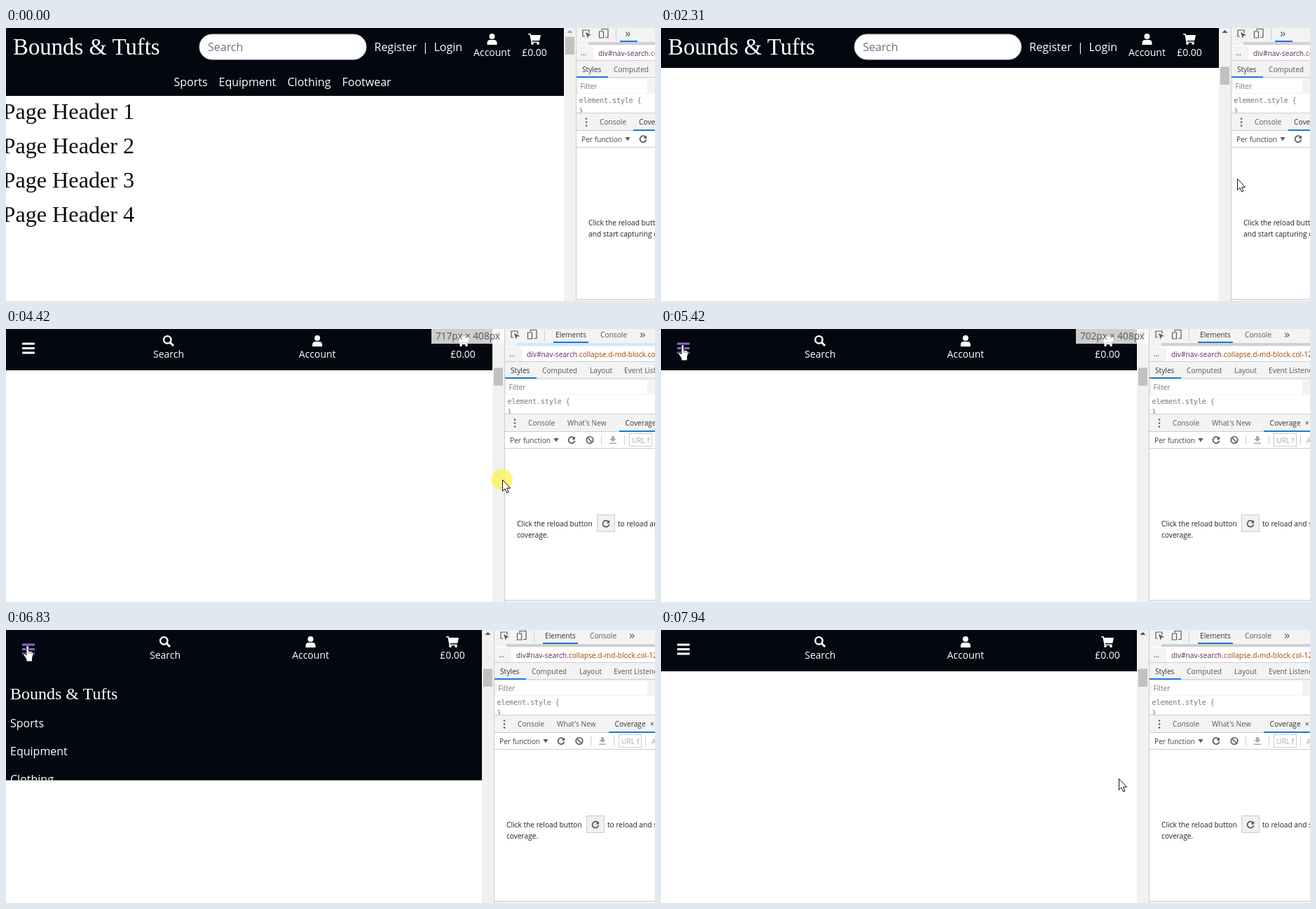
Write an HTML page that moves like this. It is 926x390 px and loops after 8000 ms.

```html
<!DOCTYPE html>
<html lang="en">
<head>
<meta charset="utf-8">
<title>Responsive navigation</title>
<style>
  html, body { margin: 0; width: 100%; height: 100%; overflow: hidden; background: #fff; }
  svg { display: block; width: 926px; height: 390px; }
  text { font-family: "Open Sans", sans-serif; white-space: pre; }
  .serif { font-family: "Liberation Serif", serif; }
  .mono { font-family: "DejaVu Sans Mono", monospace; }
</style>
</head>
<body>
<svg id="stage" viewBox="0 0 926 390"></svg>
<script>
const LOOP = 8000, SCROLLBAR = 17, MOBILE_BELOW = 762;
const DARK = '#03070f', BAR = '#f3f3f3', LINE = '#ccc', BLUE = '#1a78d8', GREY = '#5a5a5a';
const BRAND = 'Bounds &amp; Tufts';
const stage = document.getElementById('stage');

const clamp = v => Math.max(0, Math.min(1, v));
const collapse = v => 1 - (1 - clamp(v)) ** 2.2;
const smooth = v => v * v * (3 - 2 * v);

// Keys are [time, [values], smooth?]; the flag applies to the segment ending there.
function tween(t, keys) {
  if (t <= keys[0][0]) return keys[0][1];
  for (let i = 1; i < keys.length; i++) {
    const [t0, from] = keys[i - 1], [t1, to, eased] = keys[i];
    if (t < t1) {
      const p = (t - t0) / (t1 - t0), q = eased ? smooth(p) : p;
      return from.map((v, n) => v + (to[n] - v) * q);
    }
  }
  return keys[keys.length - 1][1];
}

const rect = (x, y, w, h, fill, more = '') =>
  `<rect x="${x}" y="${y}" width="${Math.max(0, w)}" height="${Math.max(0, h)}" fill="${fill}" ${more}/>`;
const text = (x, y, str, size, fill, more = '') =>
  `<text x="${x}" y="${y}" font-size="${size}" fill="${fill}" ${more}>${str}</text>`;
const path = (d, fill, more = '') => `<path d="${d}" fill="${fill}" ${more}/>`;
const line = (d, color, width) => path(d, 'none', `stroke="${color}" stroke-width="${width}"`);
const at = (x, y, content) => `<g transform="translate(${x} ${y})">${content}</g>`;

const icons = {
  user: '<circle cy="-4" r="4" fill="#fff"/>' +
    path('M-7 8V5.5Q-7 1 -2.8 1H2.8Q7 1 7 5.5V8Q7 8 6 8H-6Z', '#fff'),
  cart: path('M-9-8H-5.4L-4.9-6H9L7.3 2H-3.4L-3.1 3.5H6.6V5H-4.4L-6.7-6.4H-9Z', '#fff') +
    '<circle cx="-3" cy="6.3" r="1.8" fill="#fff"/><circle cx="5" cy="6.3" r="1.8" fill="#fff"/>',
  search: '<circle cx="-1.7" cy="-1.7" r="5.2" fill="none" stroke="#fff" stroke-width="2.4"/>' +
    line('M2 2L7 7', '#fff', 3),
  reload: line('M3.6-2.6A4.5 4.5 0 1 0 4.5 1', '#555', 1.7) + path('M5-5V-.6H.6Z', '#555'),
  arrow: path('M.5.5V16.5L4 13.2L6.6 19L9 18L6.5 12.3H11.5Z', '#fff', 'stroke="#111"'),
  resize: path('M-10 0L-5-4V-1H5V-4L10 0L5 4V1H-5V4Z', '#fff', 'stroke="#111" stroke-width=".9"'),
  hand: path('M-2 1.5Q0-1 1.6 1.5V8L5.5 8.8Q8.2 9.4 8 12.5L6.5 18V23H-2V20L-6 13.5Q-6.3 11 -4.2 11.8L-2 14Z',
    '#fff', 'stroke="#111"') + line('M2 12V9M5 12.5V10', '#111', .8)
};

const iconLink = (x, y, icon, label) =>
  at(x, y, icons[icon]) + text(x, y + 24, label, 14, '#fff', 'text-anchor="middle"');

function desktopPage(width, scroll, navHidden) {
  const k = width / 796, height = 97 - 40 * navHidden;
  const link = (x, y, label) => text(x * k, y, label, 16, '#fff');
  const headings = [1, 2, 3, 4].map(n =>
    text(-4.5, 81 + 49 * n - scroll, `Page Header ${n}`, 32.2, '#080b12', 'class="serif"')).join('');
  const links = link(239.5, 83, 'Sports') + link(303.5, 83, 'Equipment') +
    link(401.5, 83, 'Clothing') + link(479.5, 83, 'Footwear');
  return headings + rect(0, 0, width, height, DARK) +
    `<clipPath id="nav">${rect(0, 0, width, height)}</clipPath><g clip-path="url(#nav)">${links}</g>` +
    text(10, 38, BRAND, 32.8, '#fff', 'class="serif"') +
    rect(276 * k, 9, 238 * k, 36, '#fff', 'rx="18" stroke="#ced4da"') +
    text(276 * k + 12, 33, 'Search', 16, '#6c757d') +
    link(525.5, 33, 'Register') + link(594, 33, '|') + link(610.5, 33, 'Login') +
    iconLink(693.5 * k, 16, 'user', 'Account') + iconLink(754 * k, 16, 'cart', '£0.00');
}

function mobilePage(width, open, hovered) {
  const bottom = 59 + 302 * open;
  const bars = [19.5, 26, 32.5].map(y =>
    rect(23, y, 18, 3, hovered ? '#8b68c6' : '#fff', 'rx=".8"')).join('');
  const items = ['Sports', 'Equipment', 'Clothing', 'Footwear', 'Register', 'Login'].map((label, i) =>
    text(6, 139 + 40 * i, label, 16, '#fff')).join('');
  return rect(0, 0, width, bottom, DARK) + bars +
    iconLink(width * .3343, 17, 'search', 'Search') +
    iconLink(width * .64, 17, 'user', 'Account') +
    iconLink(width - 42, 17, 'cart', '£0.00') +
    `<clipPath id="menu">${rect(0, 59, width, bottom - 59)}</clipPath><g clip-path="url(#menu)">` +
    text(6, 99, BRAND, 24, '#fff', 'class="serif"') + items + '</g>';
}

const scrollbar = (x, thumb) =>
  rect(x, 0, SCROLLBAR, 390, '#f1f1f1') + rect(x + 2, 12.5 + thumb, 13, 25.5, '#c1c1c1') +
  path(`M${x + 4.5} 7L${x + 8.5} 3L${x + 12.5} 7Z`, thumb > 0 ? '#505050' : '#a3a3a3');

// Coordinates here are relative to the left edge of the tools panel.
function devtools(left, wide, resizing) {
  const label = (x, y, str, fill = GREY) => text(x, y, str, 10.2, fill);
  const rule = y => rect(0, y, 500, 1, LINE);
  const right = 915 - left;
  let out = rect(0, 0, 500, 390, '#fff') + rect(0, 0, 500, 25, BAR) +
    rect(18, 20, 500, 4, resizing ? '#cfe8fc' : '#d0d0d0') +
    line('M19 7V3H10V12H13', GREY, 1.2) + path('M14 6L22 10L18 11L17 15Z', GREY) +
    line('M37 4V1.5H46V13.5H42M33.5 5H39.5V14H33.5Z', GREY, 1.2) + rect(57, 1, 1, 17, LINE);
  out += wide
    ? label(73, 12, 'Elements', '#333') + rect(70, 18, 50, 2, BLUE) +
      label(137, 12, 'Console') + text(193, 13, '»', 17, GREY)
    : text(70, 13, '»', 17, GREY) + rect(63, 18, 25, 2, BLUE);

  out += rect(0, 26, 25, 20, BAR) + label(7, 39, '…', '#333') +
    label(32, 40, '<tspan fill="#5d2a5d">div#nav-search</tspan>' +
      '<tspan fill="#994500">.collapse.d-md-block.col-12</tspan>') +
    rule(46) + rect(0, 47, 500, 24, BAR) +
    label(9, 62.5, 'Styles', '#333') + label(54, 62.5, 'Computed') +
    label(122, 62.5, 'Layout') + label(171, 62.5, 'Event Listeners') +
    rule(70) + rect(0, 69, 46, 2, BLUE) +
    rect(0, 71, 500, 23, BAR) + rect(4, 73, right - 4, 20, '#fff') + label(6.5, 87, 'Filter', '#777') +
    rect(0, 94, 500, 28, '#fff') +
    text(4.5, 107, 'element.style {', 9.9, '#777', 'class="mono"') +
    text(4.5, 121.5, '}', 9.9, '#777', 'class="mono"');

  out += rect(0, 121, 500, 26, BAR) + rule(121) + rule(146) +
    [129.5, 134.5, 139.5].map(y => `<circle cx="15" cy="${y}" r="1.3" fill="${GREY}"/>`).join('') +
    label(34, 138, 'Console');
  out += wide
    ? label(90, 138, 'What\'s New') + label(172.5, 138, 'Coverage', '#333') +
      label(223, 138, '×', '#333') + rect(164, 145, 75, 2, BLUE)
    : label(90, 138, 'Coverage', '#333') + rect(82, 145, 75, 2, BLUE);

  out += rule(170) + label(8, 162.5, 'Per function', '#444') +
    path('M70.5 156H77.5L74 161.5Z', GREY) + at(96, 158.5, icons.reload);
  if (wide) {
    out += '<circle cx="122" cy="158.5" r="4.8" fill="none" stroke="#555" stroke-width="1.6"/>' +
      line('M118.7 155.2L125.3 161.8', '#555', 1.6) +
      rect(138, 152, 1, 13, LINE) + rect(171, 152, 1, 13, LINE) + rect(216, 152, 1, 13, LINE) +
      path('M153 153H157V157H160L155 161L150 157H153ZM150 162.5H160V164H150Z', '#aaa') +
      rect(178.5, 149.5, 32, 18, '#fff', `stroke="${LINE}"`) + label(182, 163, 'URL f', '#aaa') +
      label(225, 163, 'All', '#aaa');
  }
  const message = wide ? ['to reload and start capturing', 'coverage.'] : ['to reload', 'and start capturing coverage.'];
  out += label(18, 282, 'Click the reload button', '#222') +
    rect(132.5, 265.5, 25, 24, '#f1f1f1', `stroke="${LINE}"`) + at(145, 278, icons.reload) +
    label(162, 282, message[0], '#222') + label(18, 298, message[1], '#222') +
    rect(0, 387, 500, 3, BAR) + rule(387) + rect(0, 0, 1, 390, LINE);
  return at(left, 0, out);
}

const panelKeys = [[3640, [813]], [3850, [785]], [4020, [785]], [4420, [711]], [4560, [696]]];
const pointerKeys = [
  [70, [701, 318]], [300, [625, 250]], [460, [625, 250]], [530, [623, 249]], [680, [620, 249]],
  [1560, [620, 249]], [2310, [822, 215], true], [2720, [822, 215]], [2940, [818, 215]],
  [3190, [818, 215]], [3300, [814, 215]], [4560, [694, 216]], [4860, [186, 123]],
  [5180, [31, 22]], [7240, [31, 22]], [7940, [653, 212], true]
];

function pointer(t, panel) {
  if (t < 70) return '';
  if (t >= 3700 && t < 4560) {
    return `<circle cx="${panel - 3}" cy="215" r="15" fill="#fbf45a" fill-opacity=".8"/>` +
      at(panel - 3, 215, icons.arrow);
  }
  const [x, y] = tween(t, pointerKeys);
  const shape = x < 44 && y < 44 ? 'hand' : Math.abs(x - panel) < 3 ? 'resize' : 'arrow';
  return at(x, y, icons[shape]);
}

function draw(t) {
  const panel = Math.round(tween(t, panelKeys)[0]), width = panel - SCROLLBAR;
  const wide = panel < MOBILE_BELOW;
  const thumb = 43 * clamp((t - 660) / 800);
  const open = t < 6830 ? collapse((t - 5440) / 350) : 1 - collapse((t - 6740) / 350);
  const hovered = t >= 5120 && t < 7300;
  const sizeLabel = t >= 3700 && t < 5480
    ? rect(panel - 104, 0, 104, 21, '#fff', 'fill-opacity=".8"') +
      text(panel - 98, 14.5, `${panel + 6}px × 408px`, 13.6, '#555')
    : '';
  stage.innerHTML =
    (wide ? mobilePage(width, open, hovered) : desktopPage(width, thumb * 15, collapse((t - 956) / 350))) +
    scrollbar(width, thumb) + sizeLabel +
    devtools(panel, wide, t >= 4080 && t < 4560) + pointer(t, panel);
}

const start = performance.now();
function frame() {
  draw((performance.now() - start) % LOOP);
  requestAnimationFrame(frame);
}
frame();
</script>
</body>
</html>
```
